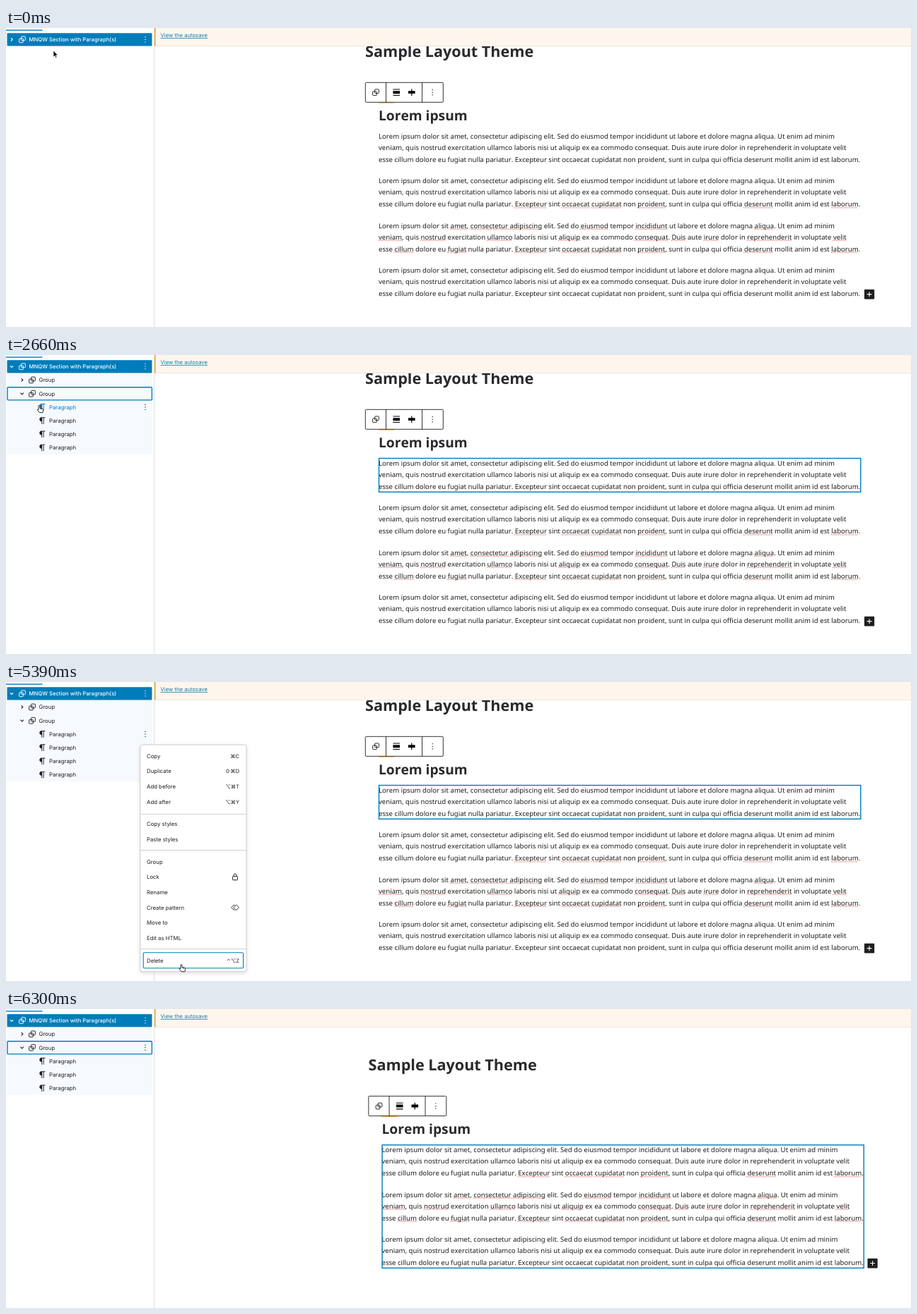
An HTML page for the animation above (6.37 s loop, 1280 by 424 pixels).

```html
<!DOCTYPE html>
<html lang="en">
<head>
<meta charset="utf-8">
<title>Block list</title>
<style>
html, body { margin: 0; width: 100%; height: 100%; overflow: hidden; background: #fff; }
svg { display: block; text-rendering: geometricPrecision; }
.ui { font: 7.8px Inter, "DejaVu Sans", sans-serif; }
.ui .key { font-size: 7.4px; text-anchor: end; }
.ui .head { font-size: 7.7px; font-weight: 500; }
.ui .link { font-size: 7.7px; fill: #0a7cab; text-decoration: underline; }
text { fill: currentColor; }
p { margin: 0; }
.title { font: bold 21.6px "Noto Sans", sans-serif; font-kerning: none; }
.sub { font: bold 19.2px "Noto Sans", sans-serif; font-kerning: none; }
p { font: 9.6px/16.32px "Noto Sans", sans-serif; font-kerning: none; color: #1e1e1e; white-space: nowrap; }
u { text-decoration: underline dotted #d4473f 1px; text-underline-offset: 1.2px; text-decoration-skip-ink: none; }
.line { fill: none; stroke: currentColor; }
.blue { fill: none; stroke: #007cba; stroke-width: 1.4; }
</style>
</head>
<body>
<svg id="stage" width="1280" height="424" viewBox="0 0 1280 424" color="#1e1e1e">
  <defs>
    <g id="group" class="line" stroke-width=".95">
      <rect x="-1.35" y="-4.35" width="5.7" height="5.7" rx=".8"/>
      <rect x="-4.35" y="-1.35" width="5.7" height="5.7" rx=".8"/>
    </g>
    <path id="pilcrow" transform="scale(.6) translate(-12 -12)" fill="currentColor"
      d="M10 14C3.4 14 3.4 4 10 4H18.5V5.5H15.5V20H14V5.5H11.5V20H10Z"/>
    <path id="dots" fill="currentColor" d="M-.6-4.2h1.2v1.2h-1.2zM-.6-.6h1.2v1.2h-1.2zM-.6 3h1.2v1.2h-1.2z"/>
    <path id="chevron" class="line" stroke-width="1.1" d="M-1-2.2L1.2 0L-1 2.2"/>
    <g id="lock" class="line">
      <rect x="-3.4" y="-1" width="6.8" height="5.2" rx=".6"/>
      <path d="M-1.9-1V-2.8a1.9 1.9 0 0 1 3.8 0V-1"/>
    </g>
    <g id="pattern" class="line" stroke-width=".9">
      <path d="M1.6-3.9L5.4 0L1.6 3.9L-2.2 0Z"/>
      <path d="M-1.4-3.9L-5.3 0L-1.4 3.9M-1.4-3.9L-.2-2.7M-1.4 3.9L-.2 2.7"/>
    </g>
    <filter id="shadow" x="-10%" y="-10%" width="120%" height="120%">
      <feDropShadow dx="0" dy="2" stdDeviation="2.5" flood-opacity=".14"/>
    </filter>
  </defs>

  <g id="page">
    <text class="title" x="508" y="40.7" color="#2a2a2d">Sample Layout Theme</text>
    <rect x="527" y="104" width="22" height="2.6" fill="#f4b32c"/>
    <text class="sub" x="527" y="130.6" color="#2a2a2d">Lorem ipsum</text>
    <g id="copy"></g>
    <rect id="outline" class="blue" x="527.5" width="681.3"/>
    <g id="adder">
      <rect x="1214" y="370.7" width="14.2" height="13.8" rx="1" fill="#1e1e1e"/>
      <path d="M1221.1 374.2v6.8M1217.7 377.6h6.8" stroke="#fff" stroke-width="1.1"/>
    </g>
    <g transform="translate(508 77)">
      <rect x=".3" y=".3" width="110" height="28" rx="1.2" fill="#fff" stroke="#1e1e1e" stroke-width=".9"/>
      <path d="M29.5 .3V28.3M80.5 .3V28.3" stroke="#1e1e1e" stroke-width=".9"/>
      <use href="#group" x="15" y="14.3"/>
      <path d="M39.4 9.4h9.6v1.1h-9.6zM39.4 12.2h9.6v4h-9.6zM39.4 18h9.6v1.1h-9.6zM61 12.3h9.6v3.8H61zM65.2 9.4h1.2v9.7h-1.2z"/>
      <use href="#dots" x="95.2" y="14.3"/>
    </g>
  </g>

  <g class="ui">
    <rect x="210" width="1070" height="25.5" fill="#fef6ec"/>
    <path d="M210 25.5H1280" stroke="#e6e1da" stroke-width=".8"/>
    <rect x="209.4" width="2.3" height="25.5" fill="#f0b03c"/>
    <text class="link" x="218.5" y="13">View the autosave</text>
    <path d="M209.5 0V424" stroke="#dedede"/>
    <rect y="2.4" width="51.5" height="1.4" fill="#007cba"/>
    <rect id="branch" x="1.5" y="26" width="205.5" fill="#f6f9fd"/>
    <g id="rows"></g>
    <g id="menu"></g>
  </g>

  <g id="cursor">
    <path id="arrow" fill="#000" stroke="#fff" stroke-width=".7"
      d="M0 0V9.2L2.1 7.3L3.5 10.6L5 10L3.6 6.8H6.4Z"/>
    <path id="point" fill="#fff" stroke="#111" stroke-width=".9" stroke-linejoin="round"
      d="M-1 1C-1-.3 .9-.3 .9 1V4L4.4 4.7C5.5 5 5.8 5.7 5.6 6.8L4.8 10.3H.2L-2.6 6.9C-3.2 5.8-2.2 5.1-1 6.2ZM2.2 4.4V5.8M3.7 4.7V6"/>
    <path id="palm" fill="#fff" stroke="#111" stroke-width=".9" stroke-linejoin="round"
      d="M-2.4 5L-3.4 1.8C-3.5 .6-2.1 .4-1.7 1.4L-1.2 2.8V.3C-1-.8 .4-.8 .6 .3V2.4L1.2 .4C1.7-.5 2.9-.2 2.8 .9L2.7 3L3.4 1.9C4.2 1.2 5 1.8 4.9 2.8L4 7.5L3.2 9.4H-1.4L-4.3 5.9C-4.7 4.9-3.7 4.3-2.4 5Z"/>
  </g>
</svg>

<script>
const LOOP = 6370, STEP = 70;
const EXPAND_ROOT = 980, EXPAND_GROUP = 2100, OPEN_MENU = 3850, PRESS = 5320, REMOVE = 5400;
const ROW = 19.2, ROW_Y = 16.3, BLOCK = 63.36, BLOCK_Y = 146;
const $ = id => document.getElementById(id);
const show = (el, on) => el.style.display = on ? '' : 'none';
const move = (el, x, y) => el.setAttribute('transform', `translate(${x} ${y})`);

// Paragraphs with spell-check marks
const lines = [
  'Lorem ipsum dolor sit amet, consectetur adipiscing elit. Sed do eiusmod tempor incididunt ut labore et dolore magna aliqua. Ut enim ad minim',
  'veniam, quis nostrud exercitation ullamco laboris nisi ut aliquip ex ea commodo consequat. Duis aute irure dolor in reprehenderit in voluptate velit',
  'esse cillum dolore eu fugiat nulla pariatur. Excepteur sint occaecat cupidatat non proident, sunt in culpa qui officia deserunt mollit anim id est laborum.'
];
const tail = 'Excepteur|occaecat|cupidatat|proident|deserunt|laborum';
const typos = [
  '', tail,
  'amet|consectetur adipiscing|eiusmod|incididunt|aliqua|veniam|nostrud|ullamco|aliquip|consequat|Duis|irure|reprehenderit|velit|cillum|fugiat|' + tail,
  ''
];
const mark = words => {
  const text = lines.join('<br>');
  return words ? text.replace(new RegExp(`\\b(${words})\\b`, 'g'), '<u>$1</u>') : text;
};
$('copy').innerHTML = typos.map(w =>
  `<g><foreignObject x="527" width="720" height="54"><p>${mark(w)}</p></foreignObject></g>`).join('');

// Block list
const label = (x, text, cls = '') => `<text class="${cls}" x="${x}" y="2.8">${text}</text>`;
const ring = '<rect class="ring blue" x="2" y="-9" width="204.4" height="18.2" rx="1"/>';
const rootBar = `<rect x="1.5" y="-9.1" width="205" height="18.4" rx="1" fill="#007cba"/>
  <g class="ring" fill="none">
    <rect x="1" y="-9.6" width="206" height="19.4" rx="1.5" stroke="#007cba"/>
    <rect x="1.9" y="-8.7" width="204.2" height="17.6" rx="1" stroke="#fff" stroke-width=".7"/>
  </g>`;
const row = (icon, x, text, chevron, root) => `<g>${root ? rootBar : ring}
  ${chevron ? `<g transform="translate(${chevron})"><use class="chev" href="#chevron"/></g>` : ''}
  <use href="#${icon}" x="${x}"/>${label(x + 9.5, text, root ? 'head' : '')}
  <use class="more" href="#dots" x="197"/></g>`;
$('rows').innerHTML =
  row('group', 23, 'MNQW Section with Paragraph(s)', 8, true) +
  row('group', 37, 'Group', 22.7) + row('group', 37, 'Group', 22.7) +
  row('pilcrow', 51.5, 'Paragraph').repeat(4);

// Options menu: centre, label, shortcut or icon
const items = [
  [105, 'Copy', '⌘C'], [126.6, 'Duplicate', '⇧⌘D'], [148.2, 'Add before', '⌥⌘T'], [169.8, 'Add after', '⌥⌘Y'],
  [201.6, 'Copy styles'], [223.2, 'Paste styles'],
  [255, 'Group'], [276.6, 'Lock', '#lock'], [298.2, 'Rename'], [319.8, 'Create pattern', '#pattern'],
  [341.4, 'Move to'], [363, 'Edit as HTML'], [394.8, 'Delete', '⌃⌥Z']
];
const hint = h => !h ? '' : h[0] === '#' ? `<use href="${h}" x="324"/>` : label(330, h, 'key');
$('menu').innerHTML = `
  <rect x="190" y="89" width="150" height="321.6" rx="2.5" fill="#fff" stroke="#ccc" filter="url(#shadow)"/>
  <path d="M190 187.4H340M190 238.6H340M190 378.6H340" stroke="#d0d0d0"/>
  <rect id="focus" class="blue" x="194.2" width="141.4" height="22" rx="1.5"/>` +
  items.map(([y, text, h]) =>
    `<g class="item" transform="translate(0 ${y})">${label(199, text)}${hint(h)}</g>`).join('');

const rows = [...$('rows').children];
const blocks = [...$('copy').children];
const menuItems = [...document.querySelectorAll('.item')];

// Pointer path: time, x, y
const path = [
  [0, 67, 32], [70, 77, 17], [490, 77, 17], [840, 8, 15], [1190, 8, 15], [1610, 23.5, 51.4],
  [1820, 23.5, 51.4], [1960, 22, 53], [2100, 22, 53], [2730, 48, 72], [3150, 140, 88],
  [3430, 184, 87], [3500, 188, 77], [3710, 196, 71], [3920, 196, 71], [4270, 234.5, 240],
  [4760, 247, 415], [4970, 248, 412], [5040, 248, 400.5], [5390, 248, 400.5],
  [5670, 289, 413.5], [5880, 300, 427], [LOOP, 300, 440]
];
function pointer(t) {
  const i = Math.max(1, path.findIndex(k => k[0] > t));
  const [t0, x0, y0] = path[i - 1], [t1, x1, y1] = path[i];
  const u = Math.max(0, (t - t0) / (t1 - t0)), e = u * u * (3 - 2 * u);
  return [x0 + (x1 - x0) * e, y0 + (y1 - y0) * e];
}

// Critically damped settling after the removal
const spring = s => (1 + 20 * s) * Math.exp(-20 * s);

function draw(t) {
  const [x, y] = pointer(t);
  const removed = t >= REMOVE, menu = t >= OPEN_MENU && !removed;
  const last = t < EXPAND_ROOT ? 0 : t < EXPAND_GROUP ? 2 : 6;
  const rest = removed ? spring((t - REMOVE) / 1000) : 0;
  const slot = i => removed ? i - 1 + rest : i;

  let hover = Math.floor((y - 6.7) / ROW);
  if (menu || removed || x > 209 || hover < 1 || hover > last) hover = 0;
  const active = menu ? 3 : removed ? 2 : hover;
  const ringed = removed ? 2 : menu || t < EXPAND_ROOT ? -1 : t < EXPAND_GROUP ? 0 : 2;

  rows.forEach((el, i) => {
    show(el, i <= last && !(removed && i === 3));
    move(el, 0, ROW_Y + ROW * (i > 3 ? slot(i) : i));
    el.setAttribute('color', i === 0 ? '#fff' : i === hover ? '#007cba' : '#1e1e1e');
    show(el.querySelector('.ring'), i === ringed);
    const more = el.querySelector('.more');
    show(more, i === 0 || i === active);
    more.setAttribute('color', i === 0 ? '#fff' : '#1e1e1e');
    const open = i === 0 ? last > 0 : i === 2 && last > 2;
    el.querySelector('.chev')?.setAttribute('transform', `rotate(${open ? 90 : 0})`);
  });
  $('branch').setAttribute('height', ROW * (removed ? 5 : last));

  move($('page'), removed ? 4.5 : 0, removed ? 46.3 : 0);
  blocks.forEach((el, i) => {
    show(el, !(removed && i === 0));
    move(el, 0, BLOCK_Y + BLOCK * slot(i));
  });
  move($('adder'), 0, removed ? -BLOCK : 0);

  const [top, height] = active === 1 ? [105, 33]
    : active === 2 ? [BLOCK_Y, BLOCK * (removed ? 2 : 3) + 49]
    : [BLOCK_Y + BLOCK * (active - 3), 49];
  show($('outline'), active > 0);
  $('outline').setAttribute('y', top + .5);
  $('outline').setAttribute('height', height - 1.2);

  show($('menu'), menu);
  const pressed = t >= PRESS, under = pointer(t - STEP);
  $('focus').setAttribute('y', pressed ? 383.8 : 93.8);
  $('focus').style.strokeWidth = pressed ? 1.1 : 1.5;
  menuItems.forEach((el, i) => {
    const over = !pressed && under[0] > 198 && Math.abs(under[1] - items[i][0]) < 10.8;
    el.setAttribute('color', over ? '#007cba' : '#1e1e1e');
  });

  const gap = menu && t > 3920 && !items.some(m => Math.abs(y - m[0]) < 11);
  const kind = t < 70 || removed || gap ? 'arrow' : t >= 3430 && t < OPEN_MENU ? 'palm' : 'point';
  for (const id of ['arrow', 'point', 'palm']) show($(id), id === kind);
  move($('cursor'), x, y);
}

const start = performance.now();
function tick() {
  const t = Math.max(0, performance.now() - start) % LOOP;
  draw(Math.floor(t / STEP) * STEP);
  requestAnimationFrame(tick);
}
tick();
</script>
</body>
</html>
```
